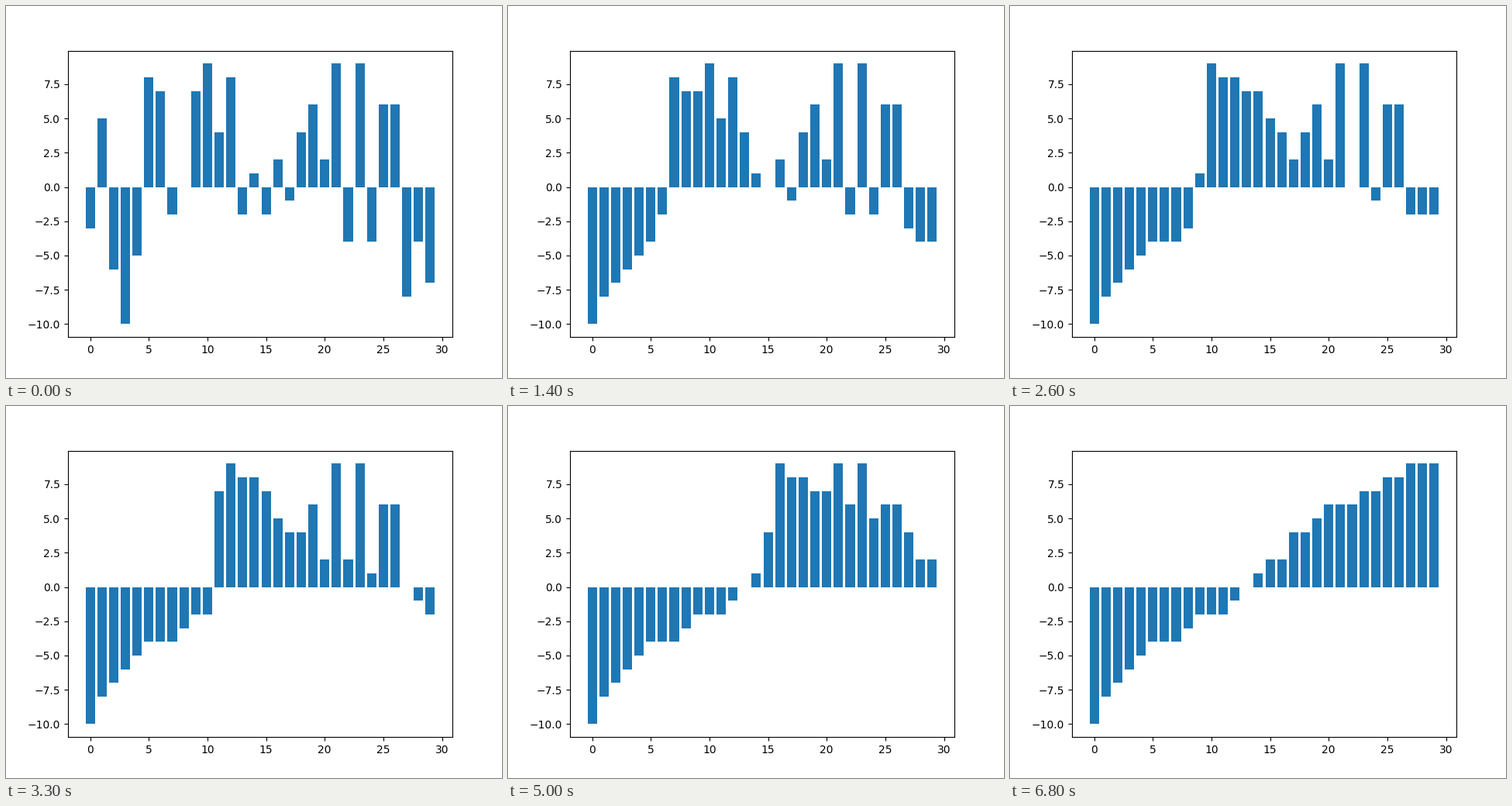
A matplotlib script for the animation above (7500 ms loop, 640 by 480 pixels).

```python
import matplotlib.pyplot as plt
from matplotlib.animation import FuncAnimation

# The unsorted input; every later picture follows from sorting it.
HEIGHTS = [-3, 5, -6, -10, -5, 8, 7, -2, 0, 7, 9, 4, 8, -2, 1,
           -2, 2, -1, 4, 6, 2, 9, -4, 9, -4, 6, 6, -8, -4, -7]
SWAPS_PER_FRAME = 2
FRAMES = 75
INTERVAL = 100


def exchange_sort(values):
    """Yield the list before sorting and after every swap."""
    a = list(values)
    yield a[:]
    for i in range(len(a)):
        for j in range(i + 1, len(a)):
            if a[j] < a[i]:
                a[i], a[j] = a[j], a[i]
                yield a[:]


# Kern glyphs to whole pixels, so that "7.5" is not drawn too tight.
plt.rcParams["text.kerning_factor"] = 6

states = list(exchange_sort(HEIGHTS))
fig, ax = plt.subplots(figsize=(6.4, 4.8), dpi=100)
bars = ax.bar(range(len(HEIGHTS)), HEIGHTS)


def update(frame):
    # The sorted list stays on screen until the loop ends.
    step = min(frame * SWAPS_PER_FRAME, len(states) - 1)
    for bar, height in zip(bars, states[step]):
        bar.set_height(height)
    return list(bars)


anim = FuncAnimation(fig, update, frames=FRAMES, interval=INTERVAL,
                     repeat=True, repeat_delay=0, blit=False)
plt.show()
```
